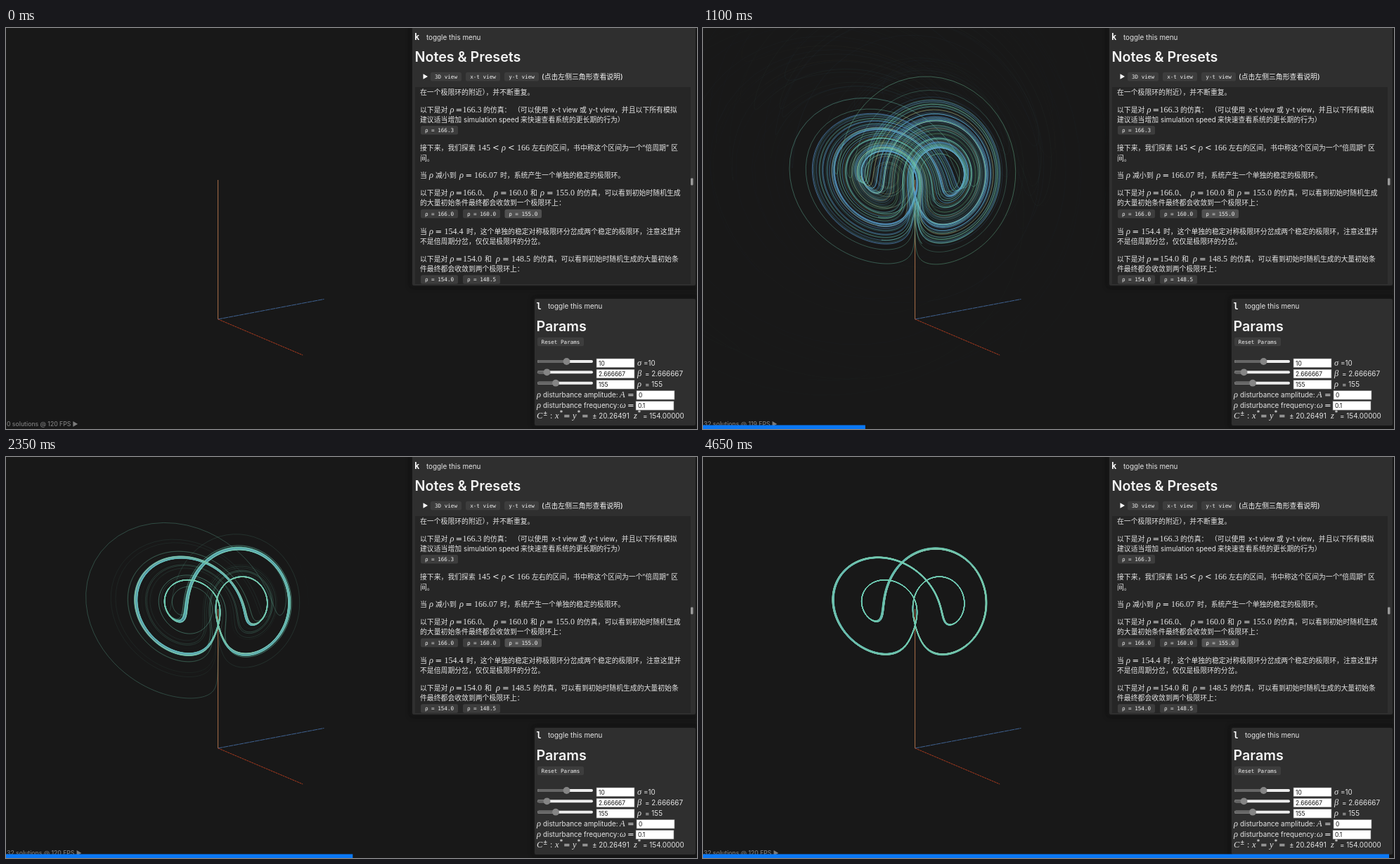
An HTML page with a canvas for the animation above (4.7 s loop, 983x570 px).

```html
<!DOCTYPE html>
<html lang="zh-CN">
<head>
<meta charset="utf-8">
<title>Lorenz system</title>
<style>
html, body { margin: 0; width: 100%; height: 100%; overflow: hidden; background: #181818; }
canvas, svg, .panel, .notes { position: absolute; left: 0; top: 0; }
.panel { background: #2f2f2f; border-radius: 2px; box-shadow: 0 0 4px 1px #3a3a3a66, 0 0 7px 2px #0009; }
.notes { background: #262626; }
text { font: 9.85px Inter, "Noto Sans CJK SC", "Noto Sans CJK", sans-serif; fill: #e6e6e6; white-space: pre; }
text.h { font-size: 19.7px; font-weight: 600; fill: #f4f4f4; }
text.key { font: bold 12px "DejaVu Sans Mono", monospace; fill: #fff; }
text.btn { font: 7.6px "DejaVu Sans Mono", monospace; text-anchor: middle; fill: #f0f0f0; }
text.field { font-size: 8.4px; fill: #111; }
text.fps { font-size: 8.65px; font-weight: 500; fill: #7c7c7c; }
text.strong { font-weight: 500; fill: #f4f4f4; }
.num { font: 12px "Liberation Serif", serif; }
.rel { font: 11.5px "DejaVu Sans", sans-serif; }
.var { font: italic 12.5px "Liberation Serif", serif; }
</style>
</head>
<body>
<canvas width="983" height="570"></canvas>
<div class="panel" style="left:578px;top:-4px;width:403px;height:370px"></div>
<div class="notes" style="left:582px;top:84px;width:392px;height:280px"></div>
<div class="panel" style="left:752px;top:385px;width:229px;height:180px"></div>
<svg width="983" height="570"></svg>
<script>
const start = performance.now();
const LOOP = 4700, STEP = 50, BIRTH = 50, LIFE = 1200;
const svg = document.querySelector('svg');
const ctx = document.querySelector('canvas').getContext('2d');

// ---------- Panels ----------
function add(tag, attrs, parent = svg) {
  const el = document.createElementNS('http://www.w3.org/2000/svg', tag);
  for (const k in attrs) el.setAttribute(k, attrs[k]);
  return parent.appendChild(el);
}
function label(x, y, str, cls = '') {
  const el = add('text', { x, y, class: cls });
  el.textContent = str;
  return el;
}
// Pairs of x and text; "$" marks a math variable, "#" a number, "~" a relation.
function line(y, ...runs) {
  const el = add('text', { y });
  for (let i = 0; i < runs.length; i += 2) {
    const cls = { $: 'var', '#': 'num', '~': 'rel' }[runs[i + 1][0]];
    const span = add('tspan', { x: runs[i], class: cls || '' }, el);
    span.textContent = cls ? runs[i + 1].slice(1) : runs[i + 1];
  }
}
function button(x, y, w, str, fill = '#3d3d3d') {
  add('rect', { x, y, width: w, height: 12.5, rx: 2.5, fill });
  label(x + w / 2, y + 9, str, 'btn');
}
function field(x, y, str) {
  add('rect', { x, y, width: 54, height: 12.6, fill: '#fff', stroke: '#777', 'stroke-width': .6 });
  label(x + 3, y + 9.5, str, 'field');
}
function slider(y, thumb) {
  add('rect', { x: 756, y: y - 2, width: 79, height: 4, rx: 2, fill: '#ececec' });
  add('rect', { x: 756, y: y - 2, width: thumb - 756, height: 4, rx: 2, fill: '#666' });
  add('circle', { cx: thumb, cy: y, r: 4.9, fill: '#858585' });
}

label(581, 17, 'k', 'key');
label(598, 16.6, 'toggle this menu');
label(581.5, 48.3, 'Notes & Presets', 'h');
add('path', { d: 'M593.5 65.3L600 69l-6.5 3.7z', fill: '#fff' });
button(604, 63, 44, '3D view');
button(654, 63, 49, 'x-t view');
button(709, 63, 49, 'y-t view');
label(762, 72.5, '(点击左侧三角形查看说明)', 'strong');

line(95, 589, '在一个极限环的附近），并不断重复。');
line(119.5, 589, '以下是对', 631.5, '$ρ', 639.5, '~=', 649.5, '#166.3', 679, '的仿真：', 722, '（可以使用',
  776, 'x-t view', 816, '或', 829, 'y-t view', 866, '，并且以下所有模拟');
line(134, 589, '建议适当增加', 651, 'simulation speed', 732, '来快速查看系统的更长期的行为）');
button(590, 139, 53, 'ρ = 166.3');
line(174, 589, '接下来，我们探索', 671, '#145', 692, '~<', 705, '$ρ', 714, '~<', 727, '#166',
  748, '左右的区间，书中称这个区间为一个', 905, '“倍周期”', 946, '区');
line(188.7, 589, '间。');
line(213.2, 589, '当', 602, '$ρ', 611, '减小到', 645, '$ρ', 653.5, '~=', 666, '#166.07',
  703, '时，系统产生一个单独的稳定的极限环。');
line(237.7, 589, '以下是对', 631.5, '$ρ', 639.5, '~=', 650, '#166.0', 677, '、', 694, '$ρ', 703, '~=', 715, '#160.0',
  746, '和', 760, '$ρ', 769, '~=', 782, '#155.0', 812, '的仿真，可以看到初始时随机生成');
line(252.2, 589, '的大量初始条件最终都会收敛到一个极限环上：');
button(590, 257.7, 53, 'ρ = 166.0');
button(650, 257.7, 53, 'ρ = 160.0');
button(709.5, 257.7, 52.5, 'ρ = 155.0', '#505050');
line(292.7, 589, '当', 602, '$ρ', 610.5, '~=', 623.5, '#154.4',
  655, '时，这个单独的稳定对称极限环分岔成两个稳定的极限环，注意这里并');
line(307.2, 589, '不是倍周期分岔，仅仅是极限环的分岔。');
line(331.7, 589, '以下是对', 631.5, '$ρ', 639.5, '~=', 650, '#154.0', 681, '和', 697, '$ρ', 706, '~=', 719, '#148.5',
  750, '的仿真，可以看到初始时随机生成的大量初始条');
line(346.2, 589, '件最终都会收敛到两个极限环上：');
button(590, 351.3, 53, 'ρ = 154.0');
button(650, 351.3, 53, 'ρ = 148.5');
add('rect', { x: 974, y: 213.5, width: 3.5, height: 10, rx: 1, fill: '#9a9a9a' });

label(754.5, 399.5, 'l', 'key');
label(771, 399.3, 'toggle this menu');
label(754.5, 431.3, 'Params', 'h');
button(756, 439.7, 66, 'Reset Params');
slider(474, 797.5);
slider(489.3, 769.5);
slider(504.7, 782);
field(840, 470, '10');
field(840, 485.2, '2.666667');
field(840, 500.5, '155');
line(479.5, 898, '$σ', 907, '=10');
line(494.5, 898, '$β', 909, '= 2.666667');
line(509.7, 898, '$ρ', 909, '= 155');
line(524.7, 755, '$ρ', 764, 'disturbance amplitude:', 873, '$A', 884, '~=');
field(897, 515.5, '0');
line(540, 755, '$ρ', 764, 'disturbance frequency:', 873, '$ω', 884, '~=');
field(896, 530.5, '0.1');
line(555, 755, '$C', 774, '#:', 781, '$x', 793, '~=', 806, '$y', 819, '~=', 834, '± 20.26491',
  893, '$z', 906, '= 154.00000');
line(551, 764, '±', 787.5, '*', 812.5, '*', 898.5, '*');

const fps = label(1, 566, '', 'fps');
const bar = add('rect', { x: 0, y: 564.5, height: 5.5, width: 0, fill: '#0a78f5' });

// ---------- Lorenz system ----------
const SIGMA = 10, BETA = 8 / 3, RHO = 155;
const DT = .0026; // model time per millisecond
const flow = ([x, y, z]) => [SIGMA * (y - x), x * (RHO - z) - y, x * y - BETA * z];
const move = (p, v, h) => [p[0] + v[0] * h, p[1] + v[1] * h, p[2] + v[2] * h];

function rk4(p, h) {
  const a = flow(p), b = flow(move(p, a, h / 2)), c = flow(move(p, b, h / 2)), d = flow(move(p, c, h));
  return p.map((v, i) => v + h / 6 * (a[i] + 2 * b[i] + 2 * c[i] + d[i]));
}
function project([x, y, z]) {
  const k = 493.6 / (374 + (y - x) * Math.SQRT1_2);
  return [490.6 + k * ((x + y) * Math.SQRT1_2 - 143.2), 285 - k * (z - 97.7)];
}
// Calls onPoint for every sample and onPeak for every crest of z.
function run(p, n, onPoint, onPeak) {
  let z0 = p[2], z1 = p[2];
  for (let i = 0; i < n; i++) {
    onPoint(p, i);
    p = rk4(rk4(p, DT / 2), DT / 2);
    if (z1 > z0 && z1 > p[2]) onPeak(z1, i);
    z0 = z1;
    z1 = p[2];
  }
}

let seed = 20;
function rand(r) {
  seed = (seed * 16807) % 2147483647;
  return (seed / 2147483647 * 2 - 1) * r;
}

// Crests of the stable cycle, taken after a long run.
let high = 0, low = 1e9;
run([1, 1, 150], 24000, () => {}, (z, i) => {
  if (i < 23000) return;
  high = Math.max(high, z);
  low = Math.min(low, z);
});

function solution() {
  const path = new Float32Array(2 * LOOP);
  let settled = 0;
  run([rand(110), rand(210), 155 + rand(210)], LOOP,
    (p, i) => path.set(project(p), 2 * i),
    (z, i) => { if (Math.min(Math.abs(z - high), Math.abs(z - low)) > 4) settled = i; });
  return { path, settled };
}

// Solutions that settle early are drawn first; the choice leans to late ones.
const COLORS = { b: '#5795cd', t: '#56a9b6', g: '#68b892', y: '#bcc078', m: '#72d2b6' };
const ORDER = 'bbtbbgbtbybbtbgbbtbbtbmgtmymgmmm';
const all = Array.from({ length: 160 }, solution).sort((a, b) => a.settled - b.settled);
const calm = all.filter(s => s.settled < 2100);
const pool = calm.length >= 2 * ORDER.length ? calm : all.slice(0, 2 * ORDER.length);
const trails = [...ORDER].map((c, i) => ({
  color: COLORS[c],
  path: pool[Math.floor((i / (ORDER.length - 1)) ** .6 * (pool.length - 1))].path
}));

// ---------- Drawing ----------
function axis(end, color, dash) {
  const a = project([0, 0, 0]), b = project(end);
  ctx.strokeStyle = color;
  ctx.setLineDash(dash);
  ctx.beginPath();
  ctx.moveTo(...a);
  ctx.lineTo(...b);
  ctx.stroke();
  ctx.setLineDash([]);
}
function drawTrail({ path, color }, now) {
  ctx.strokeStyle = color;
  for (let from = Math.max(0, now - LIFE); from < now; from += STEP) {
    const to = from + STEP, age = now - to;
    ctx.globalAlpha = .55 * (1 - age / LIFE) ** 1.3 * Math.min(1, .3 + from / 450);
    ctx.beginPath();
    for (let i = from; i <= to; i++) ctx.lineTo(path[2 * i], path[2 * i + 1]);
    ctx.stroke();
  }
  ctx.globalAlpha = 1;
}
function draw(t) {
  ctx.fillStyle = '#181818';
  ctx.fillRect(0, 0, 983, 570);
  ctx.lineWidth = 1;
  axis([0, 0, 150], '#ac7048', []);
  axis([0, 150, 0], '#3f6291', [7, .6]);
  axis([150, 0, 0], '#a83a1e', [3, .7]);
  for (const trail of trails) drawTrail(trail, t - BIRTH);
  const rate = t >= 650 && t < 1700 ? 119 : 120;
  fps.textContent = `${t < BIRTH ? 0 : ORDER.length} solutions @ ${rate} FPS ▶`;
  bar.setAttribute('width', .2099 * t);
}

let shown = -1;
function tick() {
  const t = Math.floor((performance.now() - start) % LOOP / STEP) * STEP;
  if (t !== shown) draw(shown = t);
  requestAnimationFrame(tick);
}
draw(0);
tick();
</script>
</body>
</html>
```
